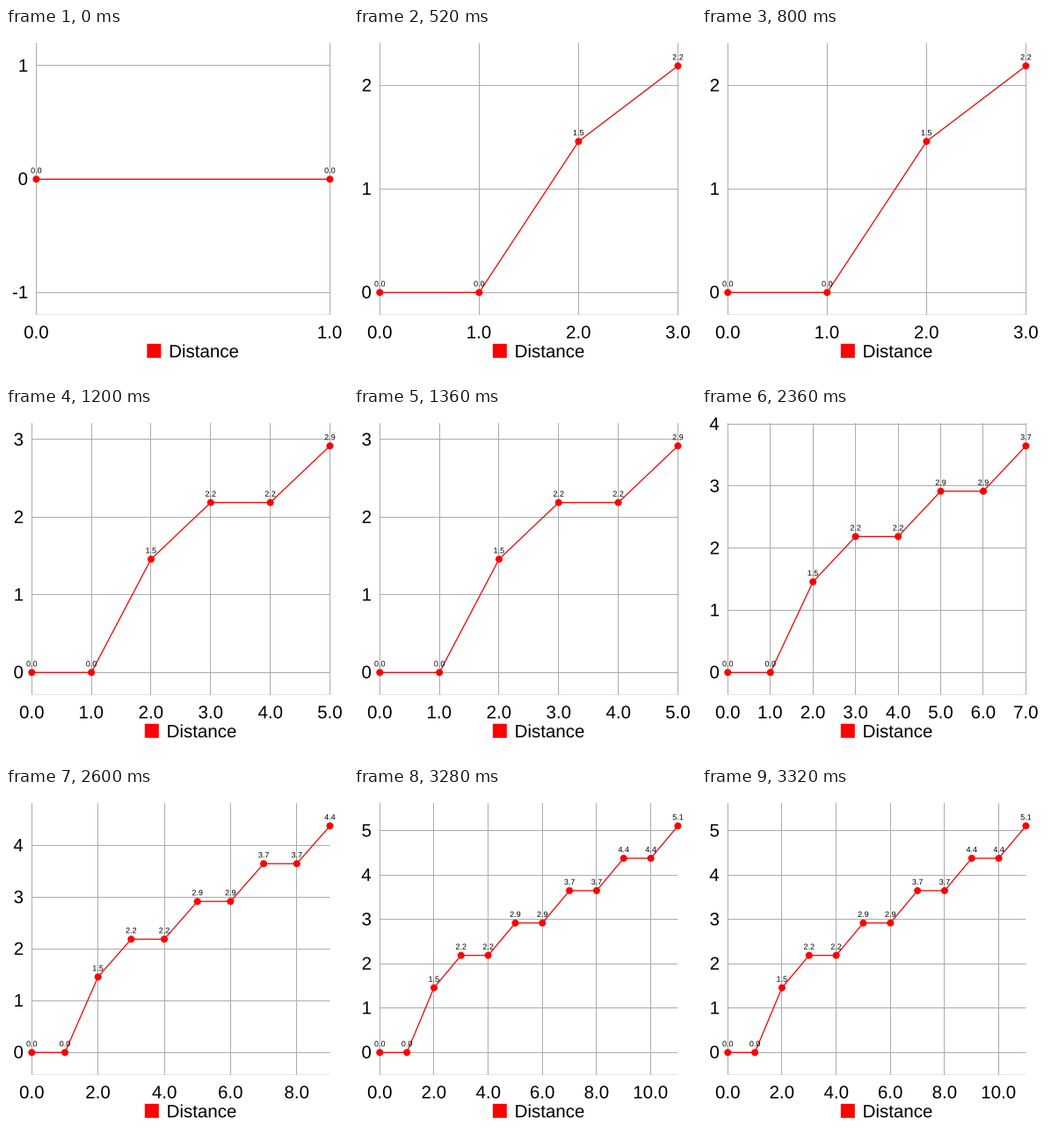
A matplotlib script that plays this animation: 389 px wide and 401 px high, repeating every 3920 ms.

```python
import math

import matplotlib.pyplot as plt
from matplotlib.animation import ArtistAnimation
from matplotlib.patches import Circle, PathPatch, Rectangle
from matplotlib.textpath import TextPath
from matplotlib.transforms import Affine2D

W, H, DPI = 389, 401, 100
STEP, LOOP = 40, 3920
PX = 72 / DPI

TOP, BOTTOM, RIGHT = 17.15, 326.9, 368.4
RED, STROKE, GRID, FAINT = "#ff0000", "#ee0808", "#acacac", "#e4e4e4"
STARTS = [0, 520, 1200, 1920, 2600, 3280]  # ms at which two more points arrive
PACE = 0.7301

plt.rcParams["font.family"] = "Liberation Sans"
plt.rcParams["path.snap"] = False

fig = plt.figure(figsize=(W / DPI, H / DPI), dpi=DPI, facecolor="white")
ax = fig.add_axes([0, 0, 1, 1])
ax.set_xlim(0, W)
ax.set_ylim(H, 0)
ax.axis("off")


def distance(i):
    return 0 if i < 2 else PACE * (2 + (i - 1) // 2)


def line(xs, ys, color=GRID, width=1, z=1):
    return ax.plot(xs, ys, color=color, lw=width * PX, zorder=z,
                   solid_capstyle="butt", solid_joinstyle="round")[0]


def crisp(v):
    """Centre of the pixel that holds v."""
    return math.floor(v) + 0.5


def label(x, y, s, size=20.5, anchor=0.5):
    """Text on baseline y; anchor 0, 0.5, 1 puts its left, middle, right at x."""
    path = TextPath((0, 0), s, size=size)
    box = path.get_extents()
    place = Affine2D().scale(1, -1).translate(x - box.x0 - anchor * box.width, y)
    return ax.add_patch(PathPatch(place.transform_path(path), fc="black",
                                  lw=0, zorder=5))


def chart(n):
    """All artists of the chart with its first n points."""
    values = [distance(i) for i in range(n)]
    low, high = (0, max(values)) if max(values) else (-1, 1)
    pad = (high - low) * 0.1
    left = 29.3 if low == 0 else 34.4

    def px(x):
        return left + (RIGHT - left) * x / (n - 1)

    def py(y):
        return BOTTOM - (BOTTOM - TOP) * (y - low + pad) / (high - low + 2 * pad)

    parts = [line([left, RIGHT], [crisp(BOTTOM)] * 2, FAINT)]

    for y in range(math.ceil(low - pad), math.floor(high + pad) + 1):
        parts.append(line([left, RIGHT], [crisp(py(y))] * 2))
        parts.append(label(left - 10.2, py(y) + 6.8, str(y), anchor=1))

    for x in range(0, n, 1 if n <= 8 else 2):
        parts.append(line([crisp(px(x))] * 2, [TOP, BOTTOM]))
        parts.append(label(px(x), 353.5, f"{x:.1f}"))

    xs = [px(i) for i in range(n)]
    ys = [py(v) + 0.2 for v in values]
    parts.append(line(xs, ys, STROKE, 1.3, 3))
    for x, y, v in zip(xs, ys, values):
        parts.append(ax.add_patch(Circle((x, y), 4, fc=RED, lw=0, zorder=4)))
        parts.append(label(x, y - 6.9, f"{v:.1f}", 9))

    key = 157.8 + (left - 29.3) / 2
    parts.append(ax.add_patch(Rectangle((key, 359.8), 16, 16, fc=RED, lw=0)))
    parts.append(label(key + 26.5, 375.2, "Distance", anchor=0))
    return parts


charts = [chart(2 * k + 2) for k in range(len(STARTS))]
frames = [charts[sum(s <= t for s in STARTS) - 1] for t in range(0, LOOP, STEP)]

anim = ArtistAnimation(fig, frames, interval=STEP, repeat=True, repeat_delay=0)
plt.show()
```
